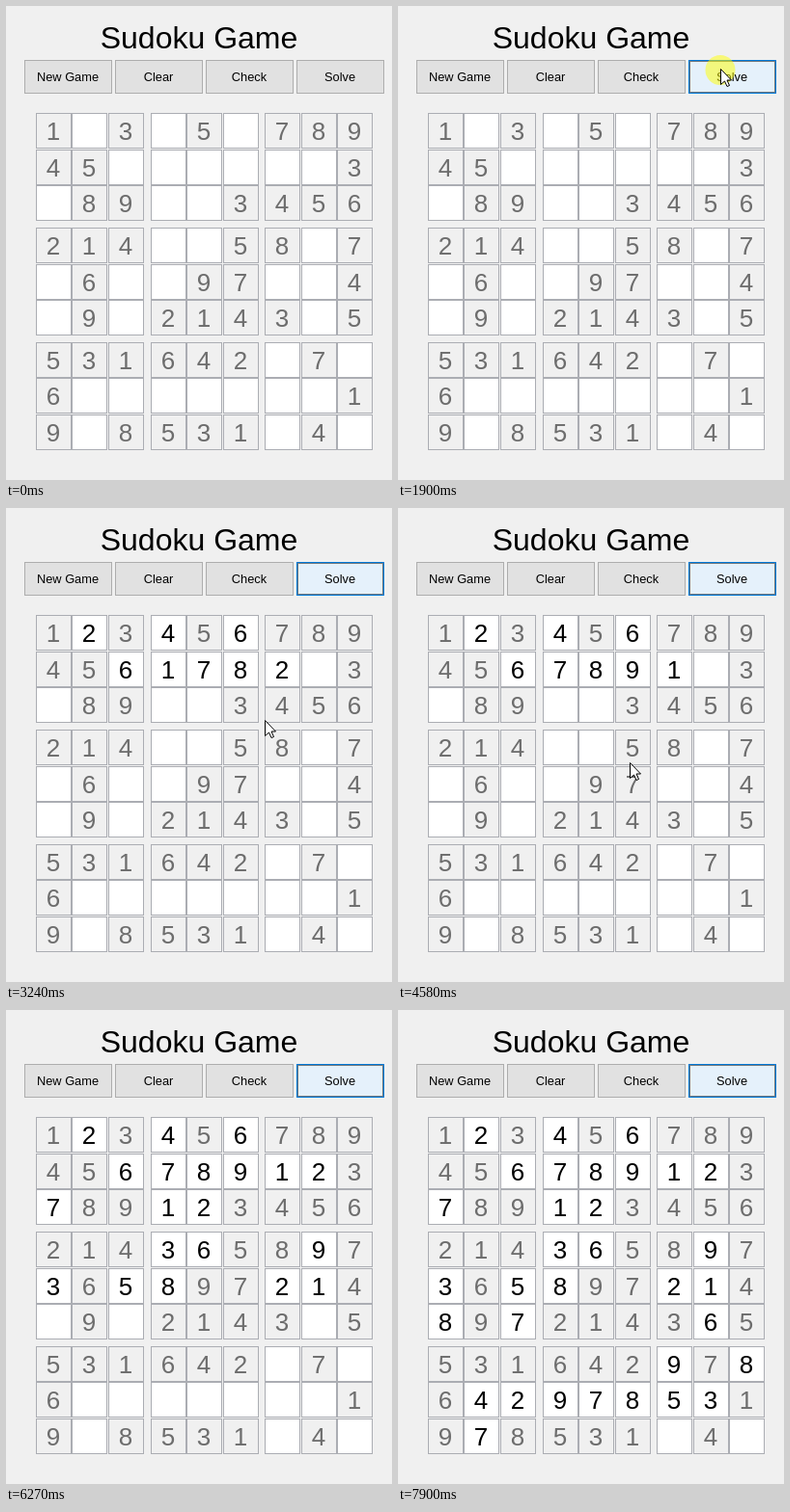
Animation of 400x492 px, one loop 8 s. Source, as an HTML page with a canvas:

```html
<!DOCTYPE html>
<html lang="en">
<head>
<meta charset="utf-8">
<title>Sudoku Game</title>
<style>
  html, body { margin: 0; width: 100%; height: 100%; overflow: hidden; background: #f0f0f0; }
  canvas { display: block; }
</style>
</head>
<body>
<canvas id="stage" width="400" height="492"></canvas>
<script>
const ctx = document.getElementById('stage').getContext('2d');
const FONT = '"Liberation Sans", Arial, sans-serif';
const LOOP = 8000;
const TICK = 200 / 3;
const HOVER = 470, CLICK = 1895, RELEASE = 2030;
const CURSOR_IN = 130, CURSOR_OUT = 6060;
const CELL = 37;

const BUTTONS = ['New Game', 'Clear', 'Check', 'Solve'];

const PUZZLE = `
  1.3.5.789 45......3 .89..3456
  214..58.7 .6..97..4 .9.2143.5
  531642.7. 6.......1 9.8531.4.
`.trim().split(/\s+/).map(row => [...row].map(c => Number(c) || 0));

const linear = k => k;
const easeIn = k => k * k;
const easeOut = k => 1 - (1 - k) ** 2;

// Pointer: where it enters, then one leg per move
const ENTRY = { x: 368, y: 428 };
const LEGS = [
  { from: 130, to: 680, x: 325, y: 58, ease: easeOut },
  { from: 880, to: 1080, x: 334, y: 65, ease: linear },
  { from: 2150, to: 3260, x: 269, y: 219, ease: linear },
  { from: 3260, to: 3530, x: 240, y: 264, ease: linear },
  { from: 5190, to: 5600, x: 240, y: 286, ease: linear },
  { from: 5690, to: 6000, x: 358, y: 417, ease: easeIn }
];

// Pixel position of row or column i, with a wider gap after each third
const gridPos = (start, i) => Math.floor(start + 118.75 * Math.floor(i / 3) + 37.5 * (i % 3));

// The solver slows down a little with every digit it places
const placeTime = n => 2005 + 107.1 * n + 0.206 * n * n;

const copy = grid => grid.map(row => row.slice());

function fits(grid, r, c, n) {
  const r0 = r - r % 3, c0 = c - c % 3;
  for (let i = 0; i < 9; i++) {
    if (grid[r][i] === n || grid[i][c] === n) return false;
    if (grid[r0 + Math.floor(i / 3)][c0 + i % 3] === n) return false;
  }
  return true;
}

// Backtracking solver that logs every digit it tries
function solve(grid, log, pos = 0) {
  while (pos < 81 && grid[Math.floor(pos / 9)][pos % 9]) pos++;
  if (pos === 81) return true;
  const r = Math.floor(pos / 9), c = pos % 9;
  for (let n = 1; n <= 9; n++) {
    if (!fits(grid, r, c, n)) continue;
    grid[r][c] = n;
    log.push({ r, c, n, time: placeTime(log.length + 1) });
    if (solve(grid, log, pos + 1)) return true;
    grid[r][c] = 0;
  }
  return false;
}

const moves = [];
solve(copy(PUZZLE), moves);

function box(x, y, w, h, fill, line) {
  ctx.fillStyle = line;
  ctx.fillRect(x, y, w, h);
  ctx.fillStyle = fill;
  ctx.fillRect(x + 1, y + 1, w - 2, h - 2);
}

function label(text, x, y, size, color) {
  ctx.font = `${size}px ${FONT}`;
  ctx.fillStyle = color;
  ctx.fillText(text, x, y);
}

function focusRing(x, y, w, h) {
  ctx.strokeStyle = '#000';
  ctx.lineWidth = 1;
  ctx.setLineDash([1, 1]);
  ctx.strokeRect(x + 0.5, y + 0.5, w - 1, h - 1);
  ctx.setLineDash([]);
}

function drawButtons(t) {
  BUTTONS.forEach((text, i) => {
    const x = 19 + 94 * i;
    const hot = text === 'Solve' && t >= HOVER;
    box(x, 56, 91, 35, hot ? '#e5f1fb' : '#e1e1e1', hot ? '#0078d7' : '#adadad');
    if (hot && t >= CLICK) focusRing(x + 1, 57, 89, 33);
    label(text, x + 45, 78, 12.8, '#000');
  });
}

function drawBoard(t) {
  const grid = copy(PUZZLE);
  for (const m of moves) if (m.time <= t) grid[m.r][m.c] = m.n;
  grid.forEach((row, r) => row.forEach((digit, c) => {
    const x = gridPos(31.3, c), y = gridPos(111.8, r);
    const given = PUZZLE[r][c];
    box(x, y, CELL, CELL, given ? '#f0f0f0' : '#fff', '#abadb3');
    if (digit) label(digit, x + 18, y + 28, 26, given ? '#6d6d6d' : '#000');
  }));
}

function cursorAt(t) {
  let { x, y } = ENTRY;
  for (const leg of LEGS) {
    const k = leg.ease(Math.min(1, Math.max(0, (t - leg.from) / (leg.to - leg.from))));
    x += (leg.x - x) * k;
    y += (leg.y - y) * k;
  }
  return [Math.round(x), Math.round(y)];
}

function drawCursor(t) {
  if (t < CURSOR_IN || t >= CURSOR_OUT) return;
  const [x, y] = cursorAt(Math.round(t / TICK) * TICK);
  if (t >= CLICK && t < RELEASE) {
    ctx.fillStyle = 'rgba(255, 255, 0, 0.5)';
    ctx.beginPath();
    ctx.arc(x, y + 1.5, 15.5, 0, Math.PI * 2);
    ctx.fill();
  }
  ctx.save();
  ctx.translate(x + 0.5, y + 0.5);
  const arrow = new Path2D('M0 0V16L4 12.5L6.5 18L9 17L6.5 11.5H11Z');
  ctx.fillStyle = '#fff';
  ctx.fill(arrow);
  ctx.strokeStyle = '#000';
  ctx.lineWidth = 1;
  ctx.stroke(arrow);
  ctx.restore();
}

function draw(t) {
  ctx.fillStyle = '#f0f0f0';
  ctx.fillRect(0, 0, 400, 492);
  ctx.textAlign = 'center';
  label('Sudoku Game', 200, 44, 32, '#000');
  drawButtons(t);
  drawBoard(t);
  drawCursor(t);
}

const start = performance.now();
function frame() {
  draw((performance.now() - start) % LOOP);
  requestAnimationFrame(frame);
}
frame();
</script>
</body>
</html>
```
